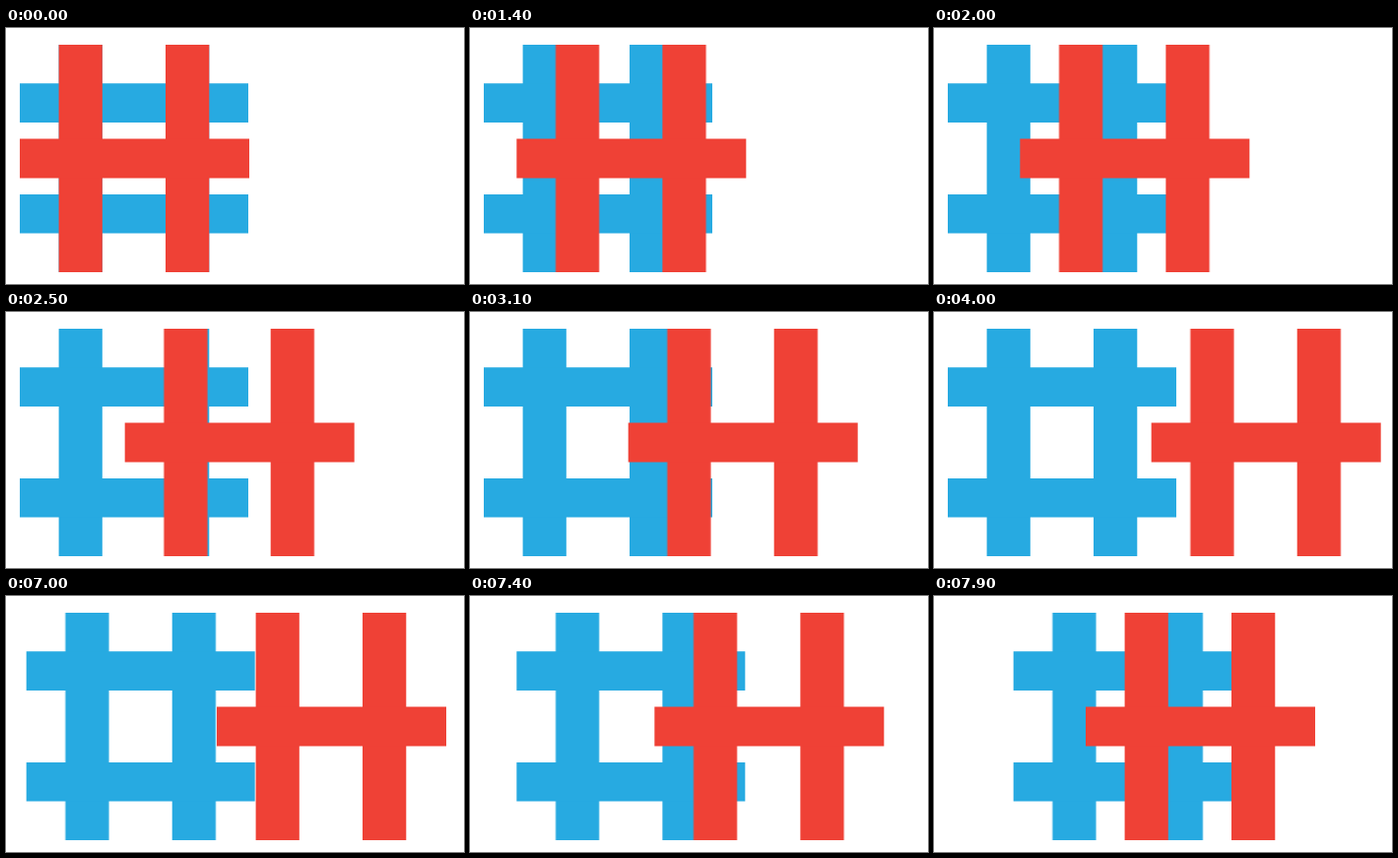
These frames come from a looping animation (465 by 260 pixels, 8 s). An HTML page:

```html
<!DOCTYPE html>
<html lang="en">
<head>
<meta charset="utf-8">
<title>Sliding hash</title>
<style>
  html, body {
    margin: 0;
    width: 100%;
    height: 100%;
    overflow: hidden;
    background: #fff;
  }
  svg {
    display: block;
    width: 100vw;
    height: 100vh;
  }
  .hash { fill: #27aae1; animation: hash 8s infinite; }
  .aitch { fill: #ef4136; animation: aitch 8s infinite; }

  /* Every 100 ms a shape moves by 20/3 px. */
  @keyframes aitch {
    0% { transform: translateX(0); animation-timing-function: step-end; }
    12.5% { transform: translateX(6.6667px); animation-timing-function: steps(30, end); }
    50% { transform: translateX(206.6667px); animation-timing-function: step-end; }
    87.5% { transform: translateX(200px); animation-timing-function: steps(10, end); }
    100% { transform: translateX(133.3333px); }
  }
  @keyframes hash {
    0% { transform: translateX(0); animation-timing-function: step-end; }
    87.5% { transform: translateX(6.6667px); animation-timing-function: steps(10, end); }
    100% { transform: translateX(73.3333px); }
  }
</style>
</head>
<body>
<svg viewBox="0 0 465 260">
  <defs>
    <path id="posts" d="M53.6 17h44.2v231h-44.2zM162 17h44.3v231H162z"/>
  </defs>
  <g class="hash">
    <use href="#posts"/>
    <path d="M14 56.3h232v39.7H14zM14 169h232v39.6H14z"/>
  </g>
  <g class="aitch">
    <use href="#posts"/>
    <path d="M14 112.5h233v40H14z"/>
  </g>
</svg>
</body>
</html>
```
